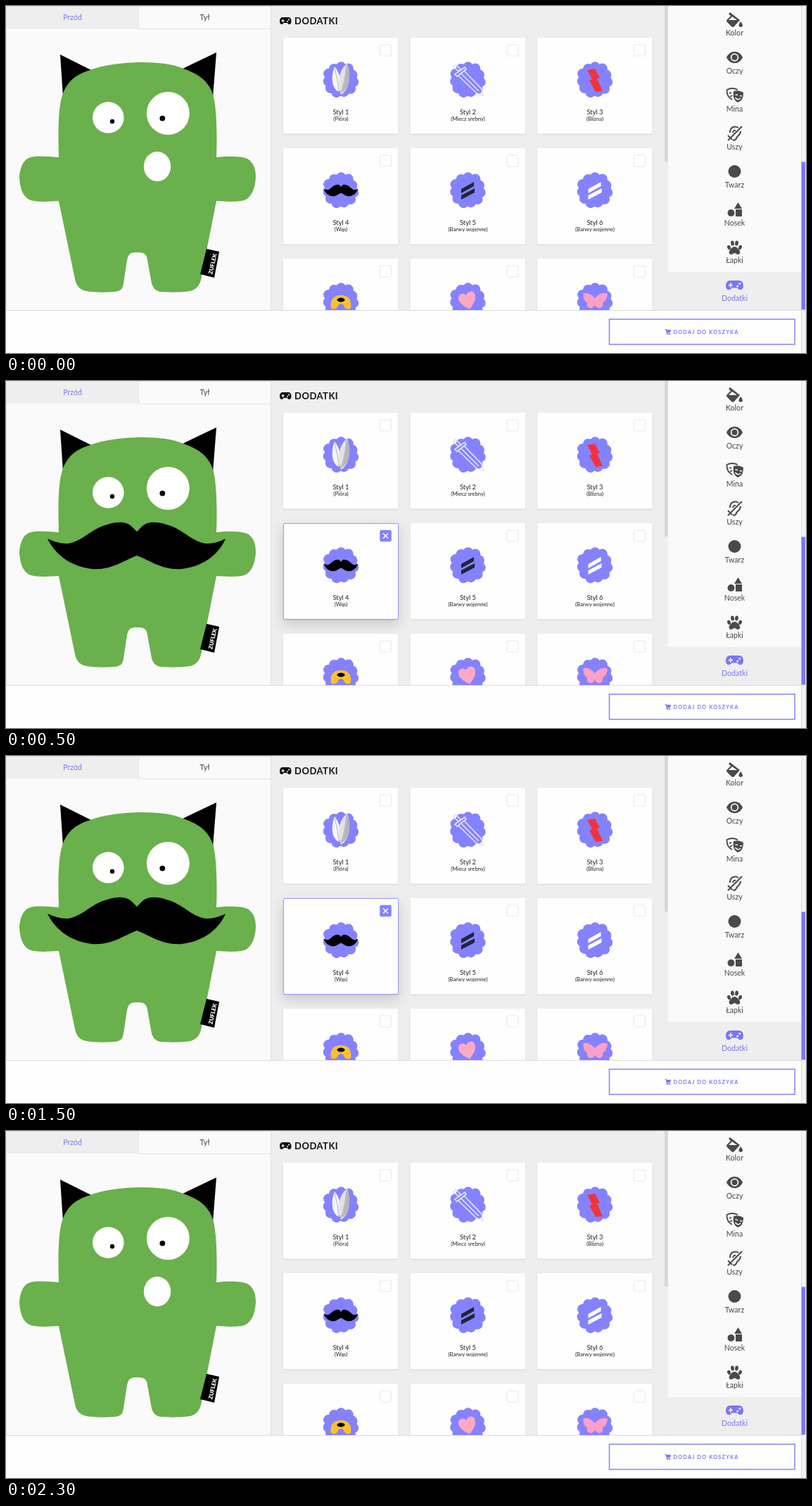
An HTML page for the animation above (2500 ms loop, 1137 by 493 pixels).

```html
<!DOCTYPE html>
<html lang="pl">
<head>
<meta charset="utf-8">
<title>Dodatki</title>
<style>
html, body { margin: 0; width: 100%; height: 100%; overflow: hidden; background: #fefefe; }
svg { display: block; }
text { font-family: Lato, "Open Sans", sans-serif; text-anchor: middle; fill: #222; }
.tab { font-size: 10.6px; fill: #444; }
.nav { font-size: 10.6px; fill: #484848; }
.name { font-size: 9.4px; }
.note { font-size: 7.7px; }
.title { font-size: 13px; font-weight: 700; letter-spacing: .5px; text-anchor: start; fill: #111; }
.buy { font-size: 7.3px; font-weight: 700; letter-spacing: 1.2px; text-anchor: start; }
.violet { fill: #7a76f6; }
.card { fill: #fefefe; filter: drop-shadow(0 1px 1px rgba(0,0,0,.1)); }
.chosen { fill: #fefefe; stroke: #9b99fb; filter: drop-shadow(0 7px 9px rgba(0,0,0,.15)); }
.lilac { fill: #8582ff; }
.wear4, .wear1 { opacity: 0; animation: wear4 2.5s step-end infinite; }
.wear1 { animation-name: wear1; }
@keyframes wear4 { 0% { opacity: 0 } 20% { opacity: 1 } 80%, 100% { opacity: 0 } }
@keyframes wear1 { 0% { opacity: 0 } 40% { opacity: 1 } 60%, 100% { opacity: 0 } }
</style>
</head>
<body>
<svg width="1137" height="493" viewBox="0 0 1137 493">
  <defs>
    <path id="stache" d="M186,214L194,206C202,199 215,200 228,204C252,210 264,229 285,231C296,231 304,228 312,224C304,243 284,263 250,267C222,269 207,256 186,248C165,256 150,269 122,267C88,263 68,243 59,224C68,228 76,231 87,231C108,229 120,210 144,204C157,200 170,199 178,206Z"/>
    <path id="pad" fill-rule="evenodd" d="M6.5,0H18.5C23,0 25,3.5 25,7.5C25,14 19,15 16.5,10.5H8.5C6,15 0,14 0,7.5C0,3.5 2,0 6.5,0ZM6,3.5V5.7H3.8V7.5H6V9.7H7.8V7.5H10V5.7H7.8V3.5ZM15.3,8a1.5,1.5 0 1 0 3,0a1.5,1.5 0 1 0 -3,0ZM18.3,4.6a1.5,1.5 0 1 0 3,0a1.5,1.5 0 1 0 -3,0Z"/>
    <path id="paint" d="M647,260L665,250V256L647,266ZM647,269L666,259V265L647,275Z"/>
    <g id="blob" class="lilac"></g>
  </defs>

  <!-- preview panel -->
  <rect width="376" height="432" fill="#fafafa"/>
  <rect width="188" height="32" fill="#eee"/>
  <path d="M0,.5H376M.5,0V432M188.5,0V32.5H376M376.5,0V432" fill="none" stroke="#e2e2e2"/>
  <text class="tab violet" x="94.5" y="20">Przód</text>
  <text class="tab" x="282.5" y="20">Tył</text>

  <path d="M77,69L123,92L81,128ZM299,66L249,90L294,130Z"/>
  <path fill="#6ab04c" d="M75,215C74,180 74,145 80,127C86,109 98,97 120,91C150,79 220,75 252,89C276,97 290,109 295,129C300,150 300,190 299,215C315,213 334,213 343,217C352,222 355,232 355,243C354,260 349,270 341,275C332,279 315,278 299,277L279,378C277,396 272,402 262,405C250,407 232,407 220,406C212,405 209,400 207,394L201,361C200,352 196,350 186,350C177,350 174,352 172,361L167,394C166,402 163,405 155,406C140,407 125,407 114,405C104,403 100,397 98,388L75,277C58,278 42,279 33,275C24,270 20,260 19,243C20,230 24,220 32,216C42,212 60,214 75,215Z"/>
  <path d="M285,345L303,349L296,386L276,381Z"/>
  <text transform="translate(296.5,367) rotate(-77)" style="font-size:8px;font-weight:900;fill:#fff">ZUFLEK</text>
  <g fill="#fff">
    <circle cx="145.3" cy="158.5" r="22.3"/>
    <circle cx="230.3" cy="152.5" r="30.5"/>
    <ellipse cx="215" cy="228" rx="19.2" ry="21.2"/>
  </g>
  <circle cx="151" cy="164" r="3.2"/>
  <circle cx="222.3" cy="159.6" r="3.9"/>
  <use href="#stache" class="wear4"/>
  <g class="wear1">
    <path fill="#fafafa" d="M280,68L299,58V66L290,88H276Z"/>
    <path fill="#d6d6d3" d="M284,57C292,51 299,58 298,66L291,71L299,70L292,79L298,78L296,98C294,112 289,124 284,132L279,142L268,134Z"/>
    <path fill="#d1d2ce" d="M264,47C272,45 279,56 280,75C281,95 277,118 268,135C257,129 250,102 252,80C253,62 257,49 264,47Z"/>
    <path fill="#a95f45" d="M273,52L284,60L285,70L279,66L284,77L277,73L283,84C287,95 286,108 282,120L279,138L268,134C274,120 278,100 276,82Z"/>
  </g>

  <!-- add-on list -->
  <rect x="377" width="564" height="432" fill="#eee"/>
  <rect x="936" width="5" height="221" fill="#d8d8d8"/>
  <use href="#pad" transform="translate(389,16) scale(.66,.76)" fill="#111"/>
  <text class="title" x="410" y="26">DODATKI</text>
  <g id="cards"></g>
  <g>
    <path fill="#f6f6fa" d="M467,86C461,101 463,117 473,122C478,110 475,96 467,86Z"/>
    <path fill="#e2e2e6" d="M485,82C474,89 470,107 476,126C488,120 491,98 485,82Z"/>
    <path fill="#b5b6b9" d="M485,82C491,98 489,117 477,123Q483,106 485,82Z"/>
    <path d="M467,88Q472,104 473,122M484,84Q482,108 475,126" fill="none" stroke="#999" stroke-width=".7"/>
  </g>
  <g fill="none" stroke="#e2e2fa" stroke-width="1.7">
    <path d="M636,86L639,83L646,90L643,93ZM638,97L652,87L654,90L641,100Z"/>
    <path d="M643,99L669,124L678,127L676,118L651,92M647,96L672,121"/>
  </g>
  <path fill="#f2333b" d="M826,91L837,89L844,102L840,103L848,121L838,122L829,106L833,104Z"/>
  <use href="#stache" transform="translate(440,203.5) scale(.194,.25)"/>
  <use href="#paint" fill="#23243a"/>
  <use href="#paint" x="180.5" fill="#fff"/>
  <path fill="#fdc12e" d="M462,429C460,416 467,411 476,411C485,411 492,416 490,429C486,432 481,430 480,425Q476,421 472,425C471,430 466,432 462,429Z"/>
  <ellipse cx="476" cy="417.5" rx="5.5" ry="3"/>
  <path fill="#fda9c4" transform="rotate(-14 656 418)" d="M656,431C647,424 643,418 644,412C646,405 654,406 656,411C658,406 667,405 668,412C669,418 665,424 656,431Z"/>
  <path fill="#fd9fc6" d="M837,415C831,408 823,406 820,409C821,416 822,420 826,421C824,427 831,434 837,425C843,434 850,427 848,421C852,420 854,416 855,409C850,406 843,408 837,415Z"/>

  <!-- side menu -->
  <rect x="941" width="189" height="432" fill="#fafafa"/>
  <rect x="941" y="378" width="189" height="54" fill="#eee"/>
  <g id="menu"></g>
  <g fill="#4a4a4a">
    <path fill-rule="evenodd" d="M1029,9L1043,20L1035,29Q1033,31 1031,29L1025,23Q1023,21 1025,19L1030,14L1027,11ZM1032,15L1027,20H1039Z"/>
    <path d="M1044,22Q1050,29 1044,30Q1039,29 1044,22Z"/>
    <path d="M1024,73C1029,62 1042,62 1047,73C1042,84 1029,84 1024,73Z"/>
    <circle cx="1035.5" cy="73" r="5.8" fill="#fafafa"/>
    <circle cx="1035.5" cy="73" r="4"/>
    <path d="M1040,119Q1032,115 1024.500,119Q1024,129 1032,133M1028,123.500H1031M1029,129L1032,127" fill="none" stroke="#4a4a4a" stroke-width="1.8"/>
    <path d="M1034,121Q1042,119 1048,123Q1048,135 1040,137Q1032,133 1034,121Z"/>
    <path d="M1036.500,126L1040,126.500M1043,127.500L1046,128M1036.500,130Q1040,135 1044,131" fill="none" stroke="#fafafa" stroke-width="1.5"/>
    <path d="M1026,191L1046,171M1029,180C1029,171 1037,170 1041,173M1044,178C1044,184 1039,184 1038,188Q1036,192 1033,190M1033,180Q1034,176 1037,177M1026,184L1032,190" fill="none" stroke="#4a4a4a" stroke-width="2"/>
    <circle cx="1035.5" cy="235" r="9"/>
    <path d="M1040.500,279L1046,288H1035ZM1037,289H1046V299H1037Z"/>
    <circle cx="1030.5" cy="294" r="5"/>
    <path d="M1035.500,342C1040,342 1047,351 1041,353C1038,353 1037,351 1035.500,351C1034,351 1033,353 1030,353C1024,351 1031,342 1035.500,342Z"/>
    <ellipse cx="1027.5" cy="343" rx="2.3" ry="3.3" transform="rotate(-20 1027.5 343)"/>
    <ellipse cx="1032.5" cy="337" rx="2.4" ry="3.6" transform="rotate(-8 1032.5 337)"/>
    <ellipse cx="1038.5" cy="337" rx="2.4" ry="3.6" transform="rotate(8 1038.5 337)"/>
    <ellipse cx="1043.5" cy="343" rx="2.3" ry="3.3" transform="rotate(20 1043.5 343)"/>
  </g>
  <use href="#pad" x="1023" y="390" class="violet"/>

  <!-- bottom bar and page scrollbar -->
  <rect y="432" width="1130" height="61" fill="#fefefe"/>
  <path d="M0,432.5H1130" stroke="#dcdcdc"/>
  <rect x="1130" width="7" height="493" fill="#f3f3f3"/>
  <path d="M1130.500,0V493" stroke="#dcdcdc"/>
  <rect x="1130.5" y="221.5" width="5.5" height="210" class="violet"/>
  <rect x="857.5" y="445" width="263.5" height="35.7" fill="#fefefe" stroke="#8683f8" stroke-width="1.5"/>
  <g class="violet">
    <path d="M936.500,459H938.500L939,460H945L944,464H939.800L940,465H944V466H939L937.800,460H936.500Z"/>
    <circle cx="939.8" cy="466.3" r="1"/>
    <circle cx="943.3" cy="466.3" r="1"/>
  </g>
  <text class="buy violet" x="948.5" y="465.5">DODAJ DO KOSZYKA</text>
</svg>
<script>
const byId = id => document.getElementById(id);

// scalloped disc: a core ringed with slightly uneven lobes
const lobes = 11;
let disc = '<circle r="23"/>';
for (let i = 0; i < lobes; i++) {
  const a = (i + .3) * 2 * Math.PI / lobes;
  const d = 18.6 + .8 * Math.sin(i * 2.3);
  disc += `<circle cx="${d * Math.cos(a)}" cy="${d * Math.sin(a)}" r="7.2"/>`;
}
byId('blob').innerHTML = disc;

const notes = ['Pióra', 'Miecz srebny', 'Blizna', 'Wąs', 'Barwy wojenne', 'Barwy wojenne', '', '', ''];

const picked = n => `<g class="wear${n}">
  <rect class="chosen" x=".5" y=".5" width="163" height="136" rx="1.5"/>
  <rect class="lilac" x="137.3" y="9.7" width="16.5" height="16.5" rx="2"/>
  <path d="M142,14.5l7,7m0,-7l-7,7" stroke="#fff" stroke-width="1.5"/></g>`;

byId('cards').innerHTML = notes.map((note, i) => {
  const n = i + 1, x = 394 + i % 3 * 180.5, y = 45 + Math.floor(i / 3) * 157;
  return `<g transform="translate(${x},${y})">
    <rect class="card" width="163.5" height="136.5" rx="2"/>
    <rect x="137.5" y="10" width="16" height="16" rx="2" fill="#fefefe" stroke="#e9e9e9"/>
    ${n === 1 || n === 4 ? picked(n) : ''}
    <use href="#blob" x="81.7" y="59.8"/>
    ${note && `<text class="name" x="82" y="109">Styl ${n}</text>
    <text class="note" x="82" y="118">(${note})</text>`}</g>`;
}).join('');

byId('menu').innerHTML = ['Kolor', 'Oczy', 'Mina', 'Uszy', 'Twarz', 'Nosek', 'Łapki', 'Dodatki']
  .map((label, i) => `<text class="nav" x="1035.5" y="${42 + i * 53.9}"${i === 7 ? ' style="fill:#7a76f6"' : ''}>${label}</text>`)
  .join('');
</script>
</body>
</html>
```
